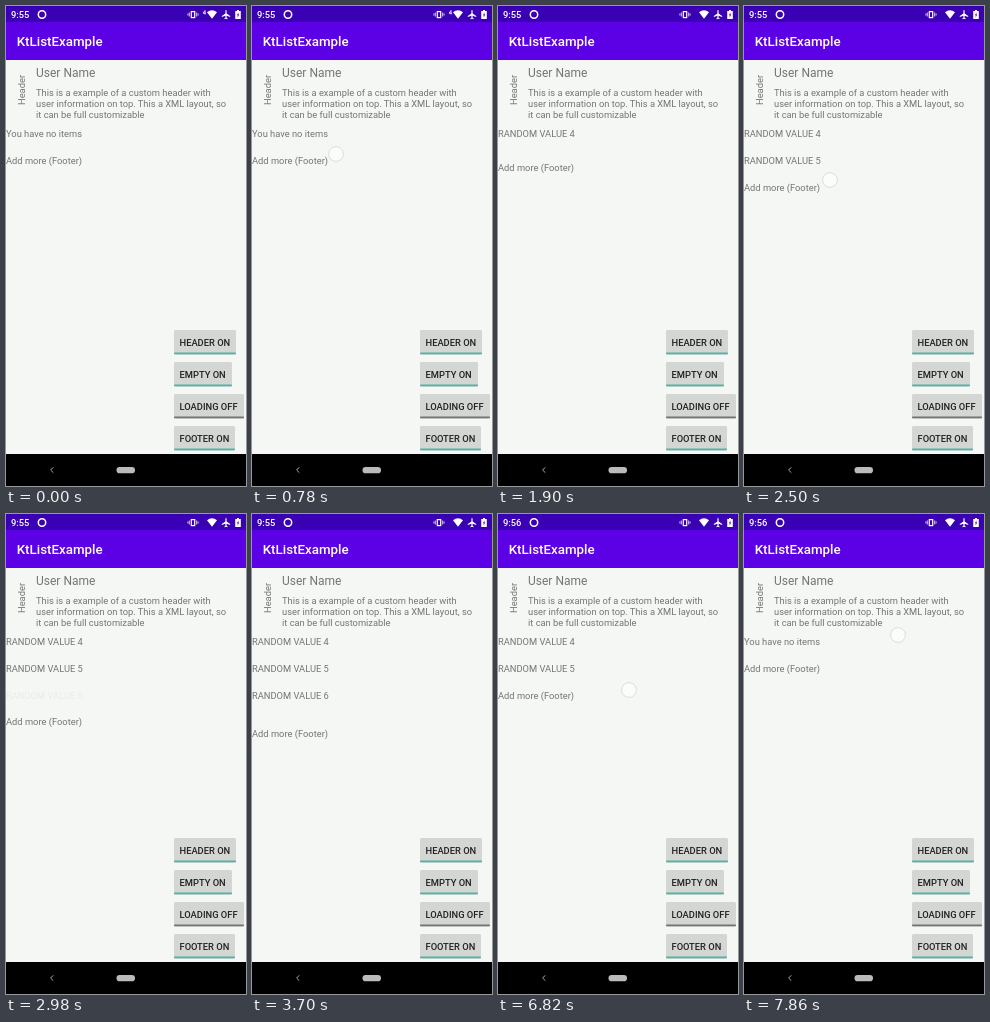
Animation of 240x480 px, one loop 8 s. Source, as an HTML page:

```html
<!DOCTYPE html>
<html lang="en">
<head>
<meta charset="utf-8">
<title>List demo</title>
<style>
html, body { margin: 0; width: 100%; height: 100%; overflow: hidden; background: #f5f7f5; }
svg { display: block; width: 240px; height: 480px; font: 9.33px Roboto, sans-serif; fill: #747574; }
.medium { font-weight: 500; }
.icon { fill: none; stroke: #fff; }
</style>
</head>
<body>
<svg viewBox="0 0 240 480">
  <rect width="240" height="480" fill="#f5f7f5"/>
  <rect width="240" height="54" y="0" fill="#5c00e6"/>
  <rect width="240" height="16" fill="#3a00b4"/>

  <g fill="#fff">
    <text id="clock" class="medium" x="5" y="12">9:55</text>
    <circle class="icon" cx="36" cy="8.5" r="3.7" stroke-width="1.5"/>
    <rect class="icon" x="185.3" y="5.6" width="3.4" height="6" stroke-width="1.2"/>
    <path class="icon" d="M183.3 6.5v4M190.7 6.5v4M181.9 7.5v2M192.1 7.5v2" stroke-width=".8"/>
    <path id="signal" d="M199 4.5v4M197 7.2h3M199 4.5l-2 2.7" class="icon" stroke-width=".8"/>
    <path d="M201 6.2Q206 2.5 211 6.2L206 12.8Z"/>
    <path d="M219.4 4.6q.6-1 1.2 0v3l3.6 2.3v1l-3.6-1.1v2l1 .8v.7l-1.6-.5-1.6.5v-.7l1-.8v-2l-3.6 1.1v-1l3.6-2.3z"/>
    <path d="M231 4h2v1h1.8v8h-5.6V5h1.8z"/>
    <path d="M232.6 6.3l-1.7 3h1l-.4 2.4 1.7-3.1h-1z" fill="#3a00b4"/>
    <text class="medium" x="10.7" y="39.8" font-size="13.33">KtListExample</text>
  </g>

  <text transform="translate(19.2 99) rotate(-90)">Header</text>
  <text x="30" y="71.3" font-size="12">User Name</text>
  <text x="30" y="90">This is a example of a custom header with</text>
  <text x="30" y="101">user information on top. This a XML layout, so</text>
  <text x="30" y="112">it can be full customizable</text>

  <text id="empty" y="131.3">You have no items</text>
  <g id="items"></g>
  <text id="footer">Add more (Footer)</text>
  <g id="buttons"></g>

  <rect y="448" width="240" height="32"/>
  <rect y="448" width="240" height="32" fill="#000"/>
  <path d="M47.3 461.3L44.6 464l2.7 2.7" fill="none" stroke="#aaa"/>
  <rect x="110.5" y="461" width="18.5" height="6.3" rx="3.1" fill="#bbb"/>
  <circle id="touch" r="7.4" fill="#fff" fill-opacity=".6" stroke="#d4d6d4" stroke-width=".8"/>
</svg>
<script>
const LOOP = 8000, ROW = 26.67, TOP = 131.3;
const MOVE = 250, FADE = 130;
const ADDS = [882, 1817, 2720, 3585];
const REMOVES = [6220, 6820, 7320, 7780];
// [start, end, x, y]
const TOUCHES = [
  [660, 860, 84, 148], [1600, 1790, 83, 149], [2500, 2690, 86, 174], [3380, 3560, 84, 200],
  [6100, 6240, 116, 197], [6700, 6840, 131, 176], [7180, 7340, 142, 150], [7660, 8200, 154, 121]
];
const BUTTONS = [['HEADER ON', 62, 1], ['EMPTY ON', 58, 1], ['LOADING OFF', 70, 0], ['FOOTER ON', 61, 1]];

const $ = id => document.getElementById(id);
const clamp = v => Math.max(0, Math.min(1, v));
const ease = v => .5 - .5 * Math.cos(Math.PI * clamp(v));

$('items').innerHTML = ADDS.map((_, i) =>
  `<text y="${TOP + i * ROW}">RANDOM VALUE ${i + 4}</text>`).join('');
$('buttons').innerHTML = BUTTONS.map(([label, w, on], i) => `
  <g transform="translate(168 ${324 + 32 * i})">
    <rect y=".8" width="${w}" height="24" rx="1.5" fill="#000" opacity=".16"/>
    <rect width="${w}" height="24" rx="1.5" fill="#d3d6d2"/>
    <rect y="22.6" width="${w}" height="1.6" rx=".7" fill="${on ? '#4fb5a9' : '#737573'}"/>
    <text class="medium" x="5.5" y="15.6" fill="#222">${label}</text>
  </g>`).join('');
const items = [...$('items').children];

function draw(t) {
  const removed = REMOVES.filter(r => t >= r).length;
  const isEmpty = t < ADDS[0] || removed === ADDS.length;
  const rows = isEmpty ? 1 : ADDS.reduce((n, a) => n + ease((t - a) / MOVE), 0) - removed;

  $('clock').textContent = t < 5420 ? '9:55' : '9:56';
  $('signal').setAttribute('opacity', t < 1600 ? 1 : 0);
  $('empty').setAttribute('opacity', isEmpty ? 1 : 0);
  $('footer').setAttribute('y', TOP + rows * ROW);
  items.forEach((item, i) => {
    const shown = i < ADDS.length - removed;
    item.setAttribute('opacity', shown ? clamp((t - ADDS[i] - MOVE) / FADE) : 0);
  });

  const touch = TOUCHES.find(([a, b]) => t >= a && t < b + 100);
  $('touch').setAttribute('opacity', touch ? clamp(1 - (t - touch[1]) / 100) : 0);
  if (touch) $('touch').setAttribute('transform', `translate(${touch[2]} ${touch[3]})`);
}

function frame() {
  draw(performance.now() % LOOP);
  requestAnimationFrame(frame);
}
frame();
</script>
</body>
</html>
```
